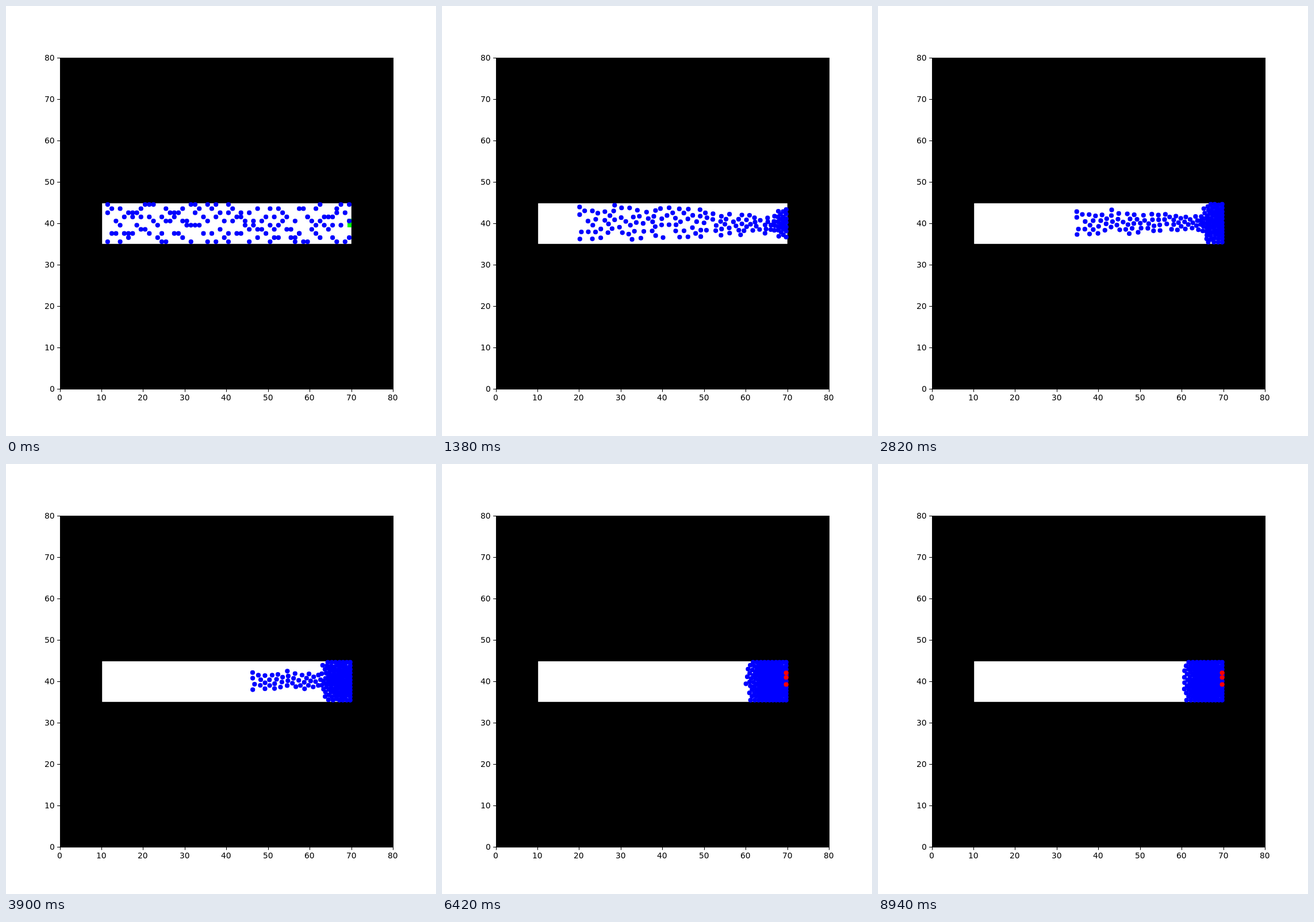
Animation of 748x748 px, one loop 9 s. Source, as an HTML page with a canvas:

```html
<!DOCTYPE html>
<html lang="en">
<head>
<meta charset="utf-8">
<title>Corridor evacuation</title>
<style>
html, body { margin: 0; width: 100%; height: 100%; overflow: hidden; background: #fff; }
canvas { display: block; }
</style>
</head>
<body>
<canvas id="stage" width="748" height="748"></canvas>
<script>
const ctx = document.getElementById('stage').getContext('2d');
const STEP_MS = 60, STEPS = 150, SUBSTEPS = 12;
const DT = STEP_MS / 1000 / SUBSTEPS;
const COUNT = 148, FIRST_COLUMN = 11, COLUMNS = 59, ROWS = 10;
const SPEED = 10.75, RELAX = 0.65;
const REACH = 0.96, SOFTNESS = 0.11, CUTOFF = 1.5, DAMPING = 6;
const DOOR = { x: 70, y: 40 };
const FALL_STEP = 92, FALLEN_Y = [42, 40.9, 39.2];
const MAX_X = 69.72, MIN_Y = 35.4, MAX_Y = 44.55;

let seed = 7;
function random() {
  seed = (seed * 16807) % 2147483647;
  return seed / 2147483647;
}

// One person in a random cell of each equal stretch of the corridor grid.
const people = Array.from({ length: COUNT }, (_, i) => {
  const cell = Math.floor((i + random()) * COLUMNS * ROWS / COUNT);
  return {
    x: FIRST_COLUMN + Math.floor(cell / ROWS) + 0.5,
    y: 35.5 + cell % ROWS,
    vx: 0, vy: 0, ax: 0, ay: 0, fallen: false
  };
});

function steer(p) {
  const dx = DOOR.x - p.x, dy = DOOR.y - p.y;
  const dist = Math.max(Math.hypot(dx, dy), 0.5);
  p.ax = (SPEED * dx / dist - p.vx) / RELAX;
  p.ay = (SPEED * dy / dist - p.vy) / RELAX;
}

function repel(p, q) {
  const dx = p.x - q.x, dy = p.y - q.y;
  if (Math.abs(dx) > CUTOFF || Math.abs(dy) > CUTOFF) return;
  const dist = Math.max(Math.hypot(dx, dy), 0.05);
  if (dist > CUTOFF) return;
  const nx = dx / dist, ny = dy / dist;
  let force = SPEED / RELAX * Math.exp((REACH - dist) / SOFTNESS);
  if (dist < REACH) force -= DAMPING * ((p.vx - q.vx) * nx + (p.vy - q.vy) * ny);
  p.ax += force * nx;
  p.ay += force * ny;
  q.ax -= force * nx;
  q.ay -= force * ny;
}

function move(p) {
  if (p.fallen) return;
  p.vx += p.ax * DT;
  p.vy += p.ay * DT;
  p.x += p.vx * DT;
  p.y += p.vy * DT;
  if (p.x > MAX_X) { p.x = MAX_X; p.vx = 0; }
  if (p.y < MIN_Y) { p.y = MIN_Y; p.vy = 0; }
  if (p.y > MAX_Y) { p.y = MAX_Y; p.vy = 0; }
}

function advance() {
  people.forEach(steer);
  for (let i = 0; i < people.length; i++)
    for (let j = 0; j < i; j++) repel(people[i], people[j]);
  people.forEach(move);
}

function fallAt(y) {
  const gap = p => Math.hypot(p.x - MAX_X, p.y - y);
  const nearest = people.filter(p => !p.fallen).reduce((a, b) => gap(b) < gap(a) ? b : a);
  Object.assign(nearest, { x: MAX_X, y, vx: 0, vy: 0, fallen: true });
}

const history = [];
for (let step = 0; step < STEPS; step++) {
  if (step === FALL_STEP) FALLEN_Y.forEach(fallAt);
  history.push(people.map(({ x, y, fallen }) => ({ x, y, fallen })));
  for (let k = 0; k < SUBSTEPS; k++) advance();
}

const px = x => 93.5 + x * 7.246;
const py = y => 665.72 - y * 7.2;

function box(color, left, top, right, bottom) {
  ctx.fillStyle = color;
  ctx.fillRect(left, top, right - left, bottom - top);
}

function drawAxes() {
  box('#fff', 0, 0, 748, 748);
  box('#000', 93.945, 89.945, 674.055, 667.055);
  ctx.font = '13.89px "DejaVu Sans", sans-serif';
  for (let v = 0; v <= 80; v += 10) {
    const x = Math.round(px(v)), y = Math.round(py(v));
    const inkWidth = v ? 16 : 7;
    box('#000', x - 0.05, 667, x + 1.05, 671.4);
    box('#000', 89.1, y - 0.05, 94, y + 1.05);
    ctx.fillText(v, Math.round(px(v) - inkWidth / 2) - 1, 686);
    ctx.fillText(v, Math.round(83.8 - inkWidth) - 1, Math.round(py(v) + 5));
  }
  box('#fff', 167.2, 343.2, 600.8, 413.8);
  box('#0f0', 594, 370, 601, 385);
}

function drawPeople(crowd) {
  for (const { x, y, fallen } of crowd) {
    ctx.fillStyle = fallen ? '#f00' : '#00f';
    ctx.beginPath();
    ctx.arc(px(x), py(y), 4.1, 0, 2 * Math.PI);
    ctx.fill();
  }
}

function render() {
  const step = Math.floor(performance.now() / STEP_MS) % STEPS;
  drawAxes();
  drawPeople(history[step].filter(p => !p.fallen));
  drawPeople(history[step].filter(p => p.fallen));
  requestAnimationFrame(render);
}
render();
</script>
</body>
</html>
```
